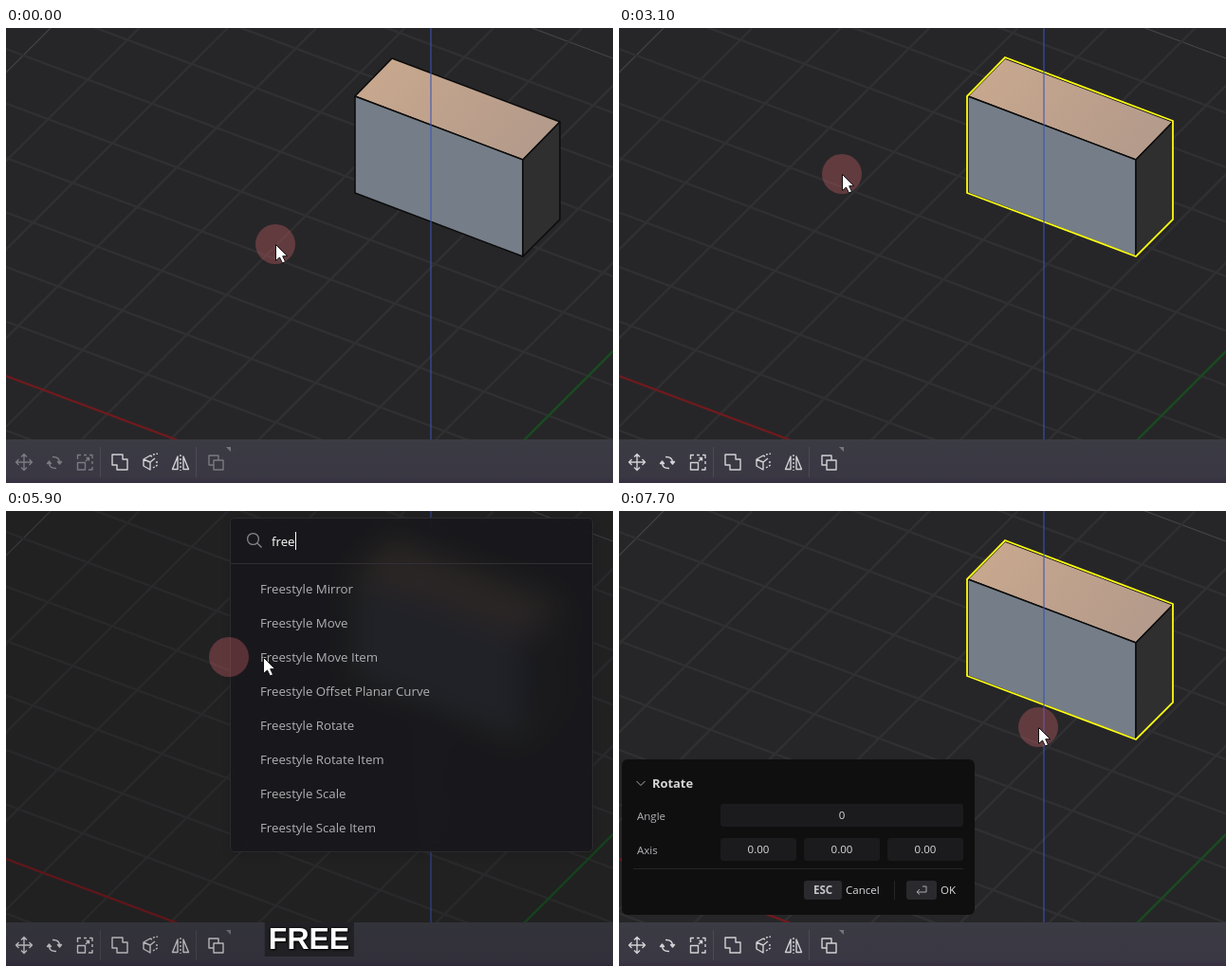
Animation, 640 px wide and 480 px high, one loop 8000 ms. Source, as an HTML page:

```html
<!DOCTYPE html>
<html lang="en">
<head>
<meta charset="utf-8">
<title>Command palette</title>
<style>
html, body { margin: 0; width: 100%; height: 100%; overflow: hidden; background: #262628; }
#stage { position: relative; width: 640px; height: 480px; overflow: hidden; font: 13.25px "Open Sans", sans-serif; color: #b0b0b3; }
#stage > * { position: absolute; }
svg { display: block; overflow: visible; }
#scene, #pointer { left: 0; top: 0; }
#dim { inset: 0; background: rgba(0, 0, 0, .14); }

#palette { left: 236px; top: 7px; width: 383px; box-sizing: border-box; overflow: hidden;
  border: 1px solid #2b2b2f; border-radius: 5px; background: rgba(24, 24, 28, .87);
  backdrop-filter: blur(15px) saturate(1.6); box-shadow: 0 2px 8px rgba(0, 0, 0, .15); }
#head { position: relative; height: 47px; border-bottom: 1px solid #313135; }
#head svg { position: absolute; left: 16px; top: 14px; }
#query { position: absolute; left: 43px; top: 6px; line-height: 36px; font-weight: 500; color: #fff; white-space: pre; }
#caret { display: inline-block; width: 1px; height: 19px; background: #fff; vertical-align: -4px; }
#list { padding-top: 8px; }
.row { display: flex; justify-content: space-between; align-items: center; height: 36px; line-height: 36px;
  margin: 0 8px 0 7px; padding: 0 20px 0 24px; border-radius: 5px; white-space: nowrap; }
.row.on { background: #9333ea; color: #fff; }
.chip { padding: 0 10px; height: 20px; line-height: 20px; border-radius: 3px; background: #303034;
  font-size: 11.4px; font-weight: 600; }
#thumb { position: absolute; right: 0; top: 57px; width: 8px; border-radius: 3px; background: #2b2b2e; }

#key { left: 320px; top: 434px; height: 36px; padding: 0 5px; transform: translateX(-50%); background: rgba(32, 32, 35, .9);
  font: bold 32px/34px "Liberation Sans", Arial, sans-serif; color: #fff; text-indent: -1px; text-shadow: 0 0 3px #000, 1px 1px 2px #000; }

#dialog { left: 3px; top: 262px; width: 372px; height: 164px; border-radius: 6px; background: #0f0f10;
  font-size: 11.5px; color: #b4b4b7; }
#dialog > * { position: absolute; }
#dialog .mid { height: 24px; line-height: 24px; white-space: nowrap; }
#dialog .field { background: #1b1b1d; border-radius: 3px; text-align: center; color: #dcdcde; }
#dialog .cap { height: 20px; line-height: 20px; border-radius: 3px; background: #2a2a2e; text-align: center;
  font-size: 11.5px; font-weight: 700; color: #c4c4c8; }
#dialog .rule { background: #262629; }
</style>
</head>
<body>
<div id="stage">
  <svg id="scene" width="640" height="480" fill="none">
    <defs>
      <linearGradient id="peach" x1="0" y1="0" x2="1" y2=".4">
        <stop offset="0" stop-color="#caa98e"/><stop offset="1" stop-color="#b59b8b"/>
      </linearGradient>
      <linearGradient id="bar" x1="0" y1="0" x2="0" y2="1">
        <stop offset="0" stop-color="#3b3b44"/><stop offset=".85" stop-color="#3a3843"/><stop offset="1" stop-color="#362f40"/>
      </linearGradient>
    </defs>
    <path d="M0 0H640V480H0z" fill="#262628"/>
    <g id="grid"></g>
    <g stroke="#0b0b0b" stroke-width="1.5" stroke-linejoin="round">
      <path d="M368 72L407 32L584 99L545 139z" fill="url(#peach)"/>
      <path d="M368 72L545 139V241L368 174z" fill="#757e88"/>
      <path d="M545 139L584 99V202L545 241z" fill="#2f2f2f"/>
    </g>
    <path id="outline" d="M367 72L407 31L584 98V202L545 241L367 174z" stroke-width="1.8"/>
    <path d="M448 0V434" stroke="#3d54b4" stroke-opacity=".64" stroke-width="1.7"/>
    <path d="M0 434H640V480H0z" fill="url(#bar)"/>
    <path d="M99.5 442V474M200.5 442V474" stroke="#4b4a55"/>
    <path d="M232 442h5v5z" fill="#77767f"/>
    <g stroke="#d2d2d5" stroke-width="1.4" stroke-linejoin="round">
      <g class="tool">
        <path d="M19 450V466M11 458H27M16 452.500L19 449.500L22 452.500M16 463.500L19 466.500L22 463.500M13.500 455L10.500 458L13.500 461M24.500 455L27.500 458L24.500 461"/>
        <path d="M49 452.500Q56 452 56.500 458M53 464.500Q46 465 45.500 459"/>
        <path d="M54.500 457.500H58.500L56.500 460zM43.500 459.500H47.500L45.500 457z" fill="#d2d2d5"/>
        <path d="M75.500 455V450.500H79M82 450.500H85M88 450.500H91V454M91 457V460M91 463V466H87M75.500 458.500H83.500V466H75.500zM84 457L87.500 453.500M84.500 453.500H87.500V456.500"/>
      </g>
      <path d="M112 450H123V455H128V466H117V461H112z"/>
      <path d="M152 451L145 455V462L152 466V458L145 455M152 458L157 454M152 451L154 452"/>
      <path d="M155 450L160 449M158 458H161M155 464L160 461" stroke-dasharray="2 1.500"/>
      <path d="M181 452V465.500H175.500zM187 452V465.500H192.500z"/>
      <path d="M184 450V467" stroke-dasharray="2 2"/>
      <g class="tool"><path d="M214 451H224V461H214z"/><path d="M219 456H229V466H219z" fill="#3a3943"/></g>
    </g>
  </svg>

  <div id="dim"></div>

  <div id="palette">
    <div id="head">
      <svg width="20" height="20" fill="none" stroke="#85858a" stroke-width="1.3"><circle cx="7.500" cy="7.500" r="5.900"/><path d="M11.800 11.800L16.500 16.500"/></svg>
      <div id="query"><span id="typed"></span><span id="caret"></span></div>
    </div>
    <div id="list"></div>
    <div id="thumb"></div>
  </div>

  <div id="dialog">
    <svg style="left:15px;top:21px" width="10" height="8" fill="none" stroke="#aaa"><path d="M.5 2L5 6.500L9.500 2"/></svg>
    <b class="mid" style="left:32px;top:13px;font-size:12.9px;color:#d8d8da">Rotate</b>
    <span class="mid" style="left:16px;top:48px">Angle</span>
    <span class="mid field" style="left:104px;top:47px;width:256px">0</span>
    <span class="mid" style="left:16px;top:84px">Axis</span>
    <span class="mid field" style="left:104px;top:83px;width:80px">0.00</span>
    <span class="mid field" style="left:192px;top:83px;width:80px">0.00</span>
    <span class="mid field" style="left:280px;top:83px;width:80px">0.00</span>
    <i class="rule" style="left:12px;top:115px;width:348px;height:1px"></i>
    <span class="cap" style="left:192px;top:128px;width:40px">ESC</span>
    <span class="mid" style="left:236px;top:126px;color:#dcdcde">Cancel</span>
    <i class="rule" style="left:287px;top:128px;width:1px;height:20px"></i>
    <span class="cap" style="left:300px;top:128px;width:32px"></span>
    <svg style="left:310px;top:133px" width="12" height="10" fill="none" stroke="#aaa"><path d="M7 1H11V7H1M4 4L1 7L4 9.500"/></svg>
    <span class="mid" style="left:336px;top:126px;color:#dcdcde">OK</span>
  </div>

  <div id="key"></div>

  <svg id="pointer" width="640" height="480">
    <circle id="halo" r="21" fill="rgba(208,98,108,.35)"/>
    <path id="arrow" d="M.5 .5V17.500L4.500 14L7.500 20L10.500 18.500L7.700 12.700H12.800z" fill="#fff" stroke="#111"/>
  </svg>
</div>

<script>
const $ = id => document.getElementById(id);
const LOOP = 8000, STEP = 100, LAG = 30;

// Ground grid: ten cells between the axes and the brighter major lines
const line = (x1, y1, x2, y2, color, width) =>
  `<path d="M${x1} ${y1}L${x2} ${y2}" stroke="${color}" stroke-width="${width}"/>`;
const lineStyle = (i, axis) => i === 0 ? [axis, 2.4] : i === 10 ? ['#464648', 1.1] : ['#303032', 2.4];
let grid = '';
for (let i = 16; i >= -1; i--) {
  const y = 367 - 57.5 * i, c = 981 - 93.4 * i;
  grid += line(0, y, 640, y + 240, ...lineStyle(i, '#701a1e'));
  if (i < 11) grid += line(c, 0, c - 480, 480, ...lineStyle(i, '#1a4a1f'));
}
$('grid').innerHTML = grid;

// Pointer path: time, x, y
const path = [
  [1070, 284, 228], [1200, 330, 209], [1300, 395, 181], [1400, 446, 163], [1500, 465, 157],
  [2670, 465, 157], [2800, 385, 186], [2870, 340, 189], [2900, 318, 184], [3000, 248, 147], [3070, 235, 154],
  [5870, 235, 154], [5900, 271, 154], [6000, 345, 165], [6100, 405, 183], [6170, 433, 195], [6200, 438, 201],
  [6300, 450, 222], [6400, 456, 243], [6500, 458, 255], [6600, 458, 261],
  [7300, 458, 261], [7370, 459, 262], [7570, 459, 262], [7670, 442, 228]
];
function pos(t) {
  const n = path.findIndex(p => p[0] > t);
  if (n === 0) return path[0].slice(1);
  if (n < 0) return path[path.length - 1].slice(1);
  const a = path[n - 1], b = path[n], k = (t - a[0]) / (b[0] - a[0]);
  return [a[1] + (b[1] - a[1]) * k, a[2] + (b[2] - a[2]) * k];
}

// Latest entry wins: time, value
const at = (track, t) => track.reduce((v, [from, next]) => t >= from ? next : v, '');
const typing = [[4500, 'f'], [4900, 'fr'], [5200, 'fre'], [5500, 'free']];
const keys = [[500, '4'], [1500, ''], [3500, 'F'], ...typing.map(([t, s]) => [t, s.toUpperCase()]), [6500, '']];
const caretResets = [3500, 4500, 4900, 5200, 5600].map(t => [t, t]);

const free = ['Mirror', 'Move', 'Move Item', 'Offset Planar Curve', 'Rotate', 'Rotate Item', 'Scale', 'Scale Item']
  .map(s => 'Freestyle ' + s);
const lists = {
  '': ['Align', 'Array', 'Boolean', 'Bridge Curve', 'Bridge Edge Surface', 'Bridge Surface', 'Center Box',
    'Center Circle', 'Constrained Surface', 'Corner Box', 'Create Solid From Faces'],
  f: ['Bridge Edge Surface', 'Bridge Surface', 'Constrained Surface', 'Create Solid From Faces',
    'Delete Face|Shift+Backspace', 'Dissolve Face', 'Draft Face', 'Explode Faces', 'File: export',
    'File: import|Ctrl+Shift+O', 'File: new|Ctrl+N'],
  fr: ['Create Solid From Faces', 'Curves From Edges', ...free, 'Surface From Mesh'],
  fre: free,
  free
};
const thumbs = { '': 30, f: 69, fr: 350, fre: 0, free: 0 };

let shown = null;
function fillList(query) {
  if (query === shown) return;
  shown = query;
  const items = lists[query];
  $('typed').textContent = query;
  $('list').innerHTML = items.map(item => {
    const [name, keys] = item.split('|');
    return `<div class="row">${name}${keys ? `<span class="chip">${keys}</span>` : ''}</div>`;
  }).join('');
  $('palette').style.height = Math.min(36 * items.length + 65, 432) + 'px';
  $('thumb').style.height = thumbs[query] + 'px';
}

const show = (id, on) => { $(id).style.display = on ? '' : 'none'; };
const place = (id, [x, y]) => $(id).setAttribute('transform', `translate(${x} ${y})`);

function render(t) {
  const tip = pos(t), halo = pos(t - LAG);
  place('arrow', tip);
  place('halo', halo);

  const picked = t >= 1800;
  $('outline').setAttribute('stroke', picked ? '#ffff14' : t >= 1400 ? '#ffff96' : 'none');
  document.querySelectorAll('.tool').forEach(g => g.setAttribute('opacity', picked ? 1 : .42));

  const open = t >= 3500 && t < 7600;
  show('palette', open);
  show('dim', open);
  show('dialog', t >= 7600);
  if (open) {
    const fade = Math.min(1, (t - 3400) / 300);
    $('palette').style.opacity = $('dim').style.opacity = fade;
    fillList(at(typing, t));
    const blink = Math.floor((t - at(caretResets, t)) / 500) % 2;
    $('caret').style.visibility = blink ? 'hidden' : '';
    const over = halo[0] >= 244 && halo[0] < 610 ? Math.floor((halo[1] - 64) / 36) : -1;
    [...$('list').children].forEach((row, i) => row.classList.toggle('on', i === over));
  }

  const key = at(keys, t);
  show('key', key);
  $('key').textContent = key;
}

const start = performance.now();
let last = -1;
function tick() {
  const t = Math.floor(((performance.now() - start) % LOOP) / STEP) * STEP;
  if (t !== last) render(last = t);
  requestAnimationFrame(tick);
}
tick();
</script>
</body>
</html>
```
